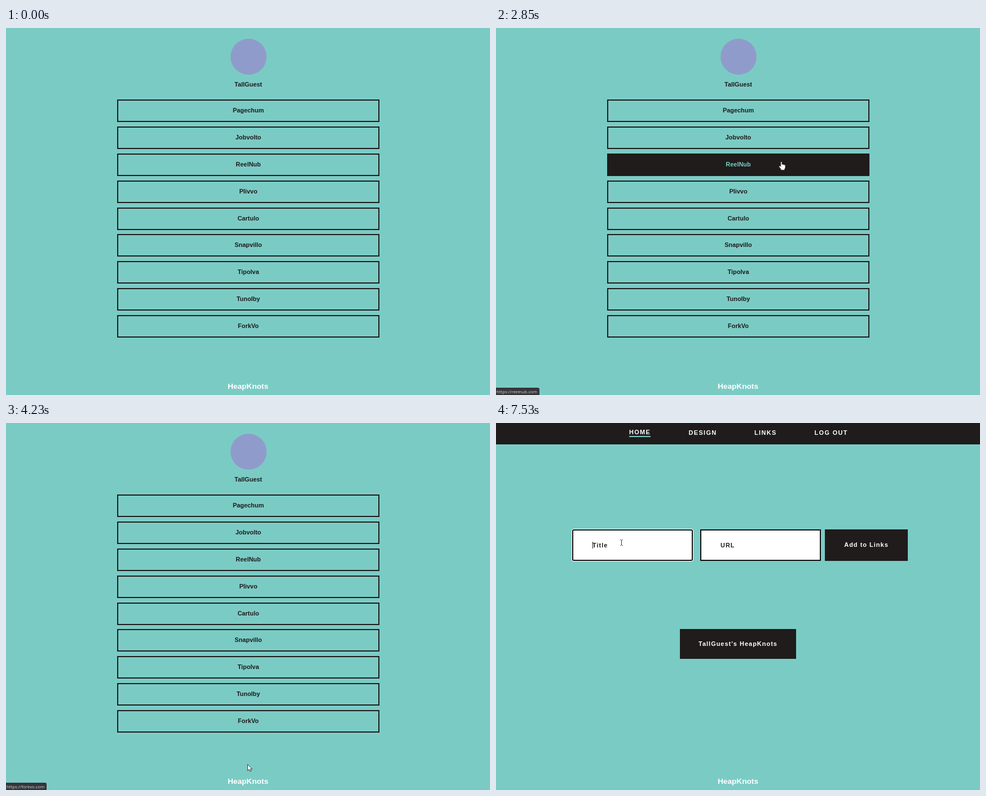
Animation, 858 px wide and 652 px high, one loop 8000 ms. Source, as an HTML page:

```html
<!DOCTYPE html>
<html lang="en">
<head>
<meta charset="utf-8">
<title>Link page</title>
<style>
  html, body { margin: 0; width: 100%; height: 100%; overflow: hidden; }
  body {
    --teal: #7bcbc5; --ink: #1f1c1b;
    position: relative; background: var(--teal); color: var(--ink);
    font: bold 10.93px/14px "Liberation Sans", Arial, sans-serif;
  }
  body *, svg { position: absolute; box-sizing: border-box; white-space: nowrap; }
  .page { inset: 0; }
  .mid { left: 197px; width: 465px; text-align: center; }
  .logo { left: 398px; top: 19px; width: 64px; height: 64px; border-radius: 50%; background: #8f9ccb; }
  .row { height: 40px; line-height: 35px; border: 2px solid var(--ink); }
  .footer { top: 630px; left: 0; width: 858px; text-align: center; font-size: 13.65px; color: #fff; }
  nav { left: 0; top: 0; width: 858px; height: 38px; background: var(--ink); color: #fff; letter-spacing: 1.36px; }
  nav span { top: 10px; }
  nav .on { top: 9px; left: 236px; height: 16px; border-bottom: 2px solid var(--teal); }
  .field, .btn { top: 189px; height: 56px; letter-spacing: 1.03px; }
  .field { width: 214px; padding-left: 34px; line-height: 52px; background: #fff; border: 2px solid #111; }
  .field.focus { border-radius: 3px; box-shadow: 0 0 0 1px #fff; }
  .btn { line-height: 55px; text-align: center; background: var(--ink); color: #fff; }
  .caret { left: 171px; top: 211px; width: 1px; height: 12px; background: #222; }
  .status {
    left: 0; bottom: 0; height: 13px; padding: 0 4px 0 1px; border-radius: 0 3px 0 0;
    background: #35363a; color: #d3d6d9; font: 7.75px/14px "Open Sans", "Noto Sans", sans-serif;
  }
  #cursor { left: 0; top: 0; width: 20px; height: 24px; overflow: visible; }
</style>
</head>
<body>
<div class="page" id="links">
  <div class="logo"></div>
  <div class="mid" style="top:93px">TallGuest</div>
</div>
<div class="page" id="admin">
  <nav>
    <span class="on">HOME</span>
    <span style="left:341.5px">DESIGN</span>
    <span style="left:458px">LINKS</span>
    <span style="left:564.5px">LOG OUT</span>
  </nav>
  <div class="field" id="title" style="left:135px">Title</div>
  <div class="field" style="left:362px">URL</div>
  <div class="btn" style="left:583px;width:147px">Add to Links</div>
  <div class="btn" style="left:326px;top:366px;width:206px;height:53px;line-height:52px">TallGuest's HeapKnots</div>
  <div class="caret" id="caret"></div>
</div>
<div class="footer">HeapKnots</div>
<div class="status" id="status"></div>
<svg id="cursor" stroke="#111" stroke-width=".8" stroke-linejoin="round" fill="#fff">
  <path id="arrow" d="M.4 .4V11.6L3 9.2L4.8 13L6.6 12.2L4.9 8.5H8.4Z"/>
  <path id="hand" stroke="#333" stroke-width=".5" d="M-1 1Q0-.5 1 1V5.2Q2 4.4 2.9 5.5Q4 4.9 4.8 6Q6.8 5.4 7 7.3V10.5Q6.5 12.5 5.6 13.5V15H-.6V13.8L-3.7 9.5Q-4.4 8-3.2 7.7Q-2 7.6-1 9.2Z"/>
  <path id="beam" fill="none" stroke="#333" stroke-width="1" d="M-1.8 .5Q0 .5 .5 1.5Q1 .5 2.8 .5M.5 1V10M-1.8 10.5Q0 10.5 .5 9.5Q1 10.5 2.8 10.5"/>
</svg>
<script>
const $ = id => document.getElementById(id);
const show = (el, on) => { el.style.display = on ? "" : "none"; };

const LOOP = 8000, MOVE = 1250, LEAVE = 4830, ADMIN = 4900, FOCUS = 6470;
const BLINK = 530, FADE = 50, LINGER = 320;
const TOP = 127.1, PITCH = 47.87, ROW_H = 40;
const FOOTER = "footer", TITLE = "title";
const TEAL = [123, 203, 197], INK = [31, 28, 27];

// stops of the pointer tip: time, x, y
const stops = [
  [MOVE, 819, 617], [1670, 713, 210], [2100, 660, 147], [2440, 660, 147],
  [2850, 506, 237], [3340, 452, 391], [4230, 428, 606], [4450, 435, 636],
  [5230, 435, 636], [5300, 410, 627], [5580, 410, 627], [5900, 211, 270],
  [6010, 231, 183], [6120, 222, 207]
];

const names = ["Pagechum", "Jobvolto", "ReelNub", "Plivvo", "Cartulo", "Snapvillo", "Tipolva", "Tunolby", "ForkVo"];
const urls = names.map(name => `https://${name.toLowerCase()}.com`);
urls[5] = urls[5].replace("https://", "");

const rows = names.map((name, i) => {
  const row = document.createElement("div");
  row.className = "mid row";
  row.style.top = TOP + PITCH * i + "px";
  row.textContent = name;
  $("links").append(row);
  return row;
});

const blend = (a, b, k) => `rgb(${a.map((v, i) => Math.round(v + (b[i] - v) * k))})`;

// Speed along one axis at stop i: harmonic mean of both sides, zero at turns.
function speed(i, axis) {
  const side = j => stops[j] && stops[j + 1]
    ? (stops[j + 1][axis] - stops[j][axis]) / (stops[j + 1][0] - stops[j][0]) : 0;
  const a = side(i - 1), b = side(i);
  return a * b > 0 ? 2 * a * b / (a + b) : 0;
}

// Smooth curve through the stops that never overshoots them.
function pointer(t) {
  const i = stops.findLastIndex(s => s[0] <= t);
  if (i < 0) return stops[0].slice(1);
  if (i === stops.length - 1) return stops[i].slice(1);
  const a = stops[i], b = stops[i + 1], d = b[0] - a[0], u = (t - a[0]) / d, v = 1 - u;
  return [1, 2].map(axis =>
    a[axis] * v * v * (1 + 2 * u) + b[axis] * u * u * (1 + 2 * v)
    + d * u * v * (v * speed(i, axis) - u * speed(i + 1, axis)));
}

// What lies under the pointer: a row number, FOOTER, TITLE or null.
function under(t) {
  const [x, y] = pointer(t);
  if (y > 628 && x > 394 && x < 464) return FOOTER;
  if (t >= ADMIN) return x > 135 && x < 349 && y > 189 && y < 245 ? TITLE : null;
  const i = Math.floor((y - TOP) / PITCH);
  const inside = x > 197 && x < 662 && rows[i] && y - TOP - i * PITCH < ROW_H;
  return inside ? i : null;
}

// The address stays for a moment after the pointer has left a link.
function address(t) {
  for (let ago = 0; ago < LINGER; ago += 10) {
    const spot = under(t - ago);
    if (spot === FOOTER) return "https://heapknots-dorvi.herokuapp.com/admin";
    if (spot in urls) return urls[spot];
  }
  return "";
}

function draw(t) {
  show($("links"), t < LEAVE);
  show($("admin"), t >= ADMIN);

  const recent = Array.from({ length: 6 }, (_, n) => under(t - FADE * n / 5));
  rows.forEach((row, i) => {
    const k = recent.filter(spot => spot === i).length / recent.length;
    row.style.background = blend(TEAL, INK, k);
    row.style.color = blend(INK, TEAL, k);
  });

  const url = address(t);
  $("status").textContent = url;
  show($("status"), url);

  $("title").classList.toggle("focus", t >= FOCUS);
  show($("caret"), t >= FOCUS && Math.floor((t - FOCUS) / BLINK) % 2 === 0);

  const [x, y] = pointer(t), spot = under(t);
  const kind = spot === TITLE ? "beam" : spot === null ? "arrow" : "hand";
  $("cursor").style.transform = `translate(${x}px, ${y}px)`;
  for (const id of ["arrow", "hand", "beam"]) show($(id), t >= MOVE && id === kind);
}

const start = performance.now();
function tick() {
  draw((performance.now() - start) % LOOP);
  requestAnimationFrame(tick);
}
tick();
</script>
</body>
</html>
```
